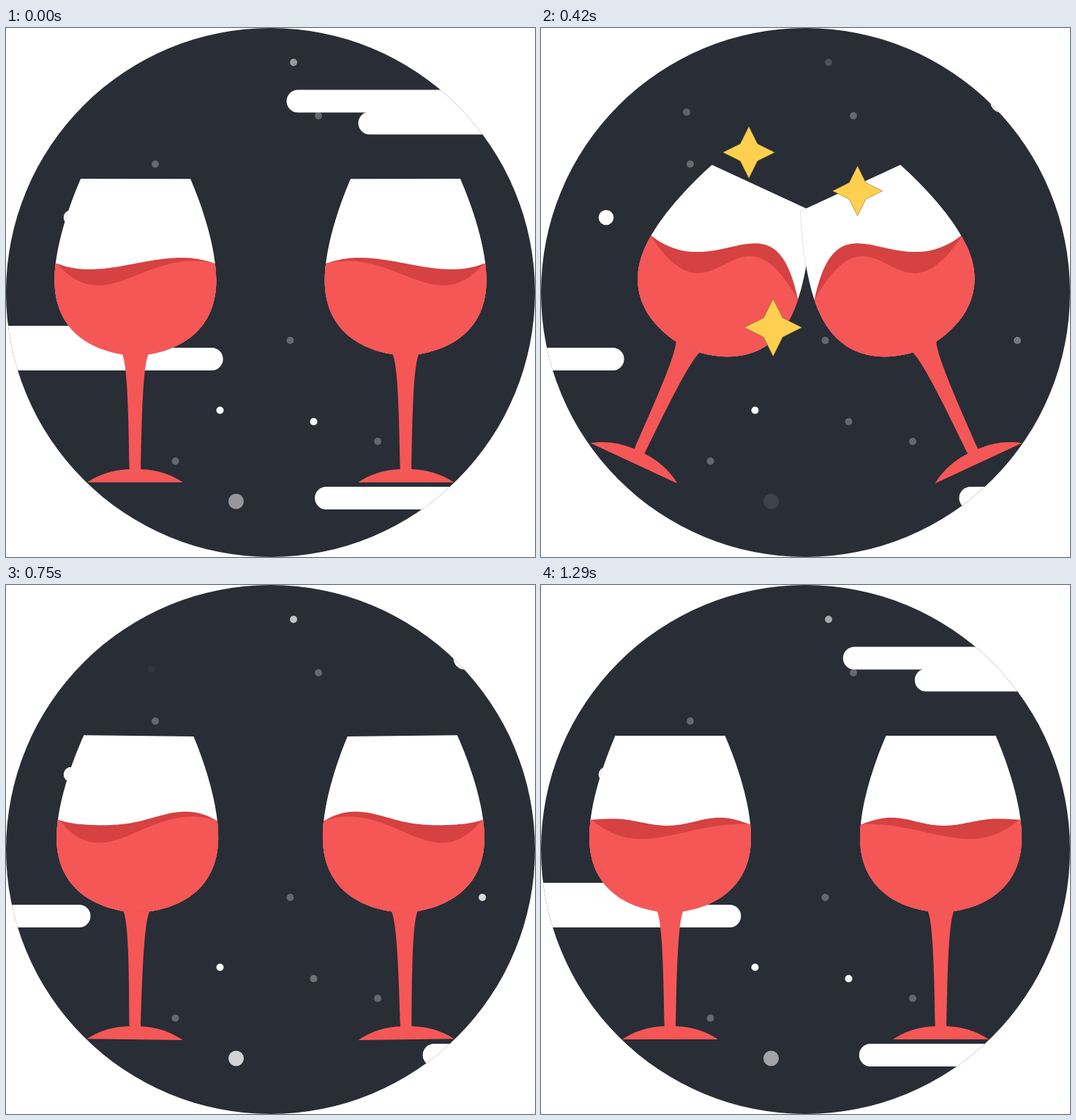
An HTML page with a canvas for the animation above (1350 ms loop, 723 px wide and 723 px high).

```html
<!DOCTYPE html>
<html lang="en">
<head>
<meta charset="utf-8">
<title>Cheers</title>
<style>
  html, body { margin: 0; width: 100%; height: 100%; overflow: hidden; background: #fff; }
  canvas { display: block; width: 723px; height: 723px; }
</style>
</head>
<body>
<canvas id="stage" width="723" height="723"></canvas>
<script>
const ctx = document.getElementById('stage').getContext('2d');
const SIZE = 723, LOOP = 1350, REST_X = 176.5, REST_Y = 330, MAX_TILT = 25.4;
const NIGHT = '#292d36', RED = '#f55757', DARK_RED = '#d64141', GOLD = '#ffd04f';
const lerp = (a, b, k) => a + (b - a) * k;

// Smooth curve through [time, value] keys, without overshoot.
function track(keys, t) {
  const last = keys.length - 1;
  let i = 0;
  while (i < last - 1 && t >= keys[i + 1][0]) i++;
  const slope = n => (keys[n + 1][1] - keys[n][1]) / (keys[n + 1][0] - keys[n][0]);
  const tangent = n => {
    if (n === 0) return slope(0);
    if (n === last) return slope(last - 1);
    const a = slope(n - 1), b = slope(n);
    return a * b <= 0 ? 0 : 2 * a * b / (a + b);
  };
  const [t0, v0] = keys[i], [t1, v1] = keys[i + 1];
  const span = t1 - t0, k = (t - t0) / span, j = 1 - k;
  return v0 * j * j * (1 + 2 * k) + v1 * k * k * (3 - 2 * k)
    + span * k * j * (tangent(i) * j - tangent(i + 1) * k);
}

// Rises from 0 at `from` to 1 at `peak`, back to 0 at `to`; may wrap around the loop.
function pulse(t, from, peak, to) {
  if (t < from) t += LOOP;
  if (t >= to) return 0;
  return t < peak ? (t - from) / (peak - from) : (to - t) / (to - peak);
}

const TILT = [[0, 0], [120, 10.56], [270, 23.6], [330, MAX_TILT], [510, 23.6],
  [630, 11.5], [780, 0], [LOOP, 0]];
const SLOSH = [[0, 28], [120, -75], [330, 0], [510, 133], [630, 76], [870, 10],
  [1290, 10], [LOOP, 28]];
const RIPPLE = [[0, 0], [630, 0], [870, 5], [1290, 5], [LOOP, 0]];
const DRIFT = [[0, 0], [120, .22], [330, .545], [510, 1], [630, 1], [870, .545],
  [1290, .107], [LOOP, 0]];

const STEADY_DOTS = [[427, 120], [204, 186], [388.5, 427], [508, 565], [231.5, 592]];
const TWINKLES = [
  { x: 393, y: 47, r: 5, max: 1, span: [345, 950, 345 + LOOP] },
  { x: 420.5, y: 538, r: 5, max: 1, span: [545, 1320, 545 + LOOP] },
  { x: 314.5, y: 647, r: 10.5, max: 1, span: [390, 870, 390 + LOOP] },
  { x: 199, y: 115, r: 5, max: .28, span: [80, 380, 800] },
  { x: 651, y: 427, r: 5, max: .85, span: [240, 740, 1280] }
];
const SPARKS = [
  { from: [321, 212], to: [248, 129], r: 42 },
  { from: [379, 250], to: [485, 196], r: 40 },
  { from: [339, 332], to: [296, 485], r: 48 }
];

const bowl = new Path2D('M-75 206C-91 243-110.5 300-110.5 345C-110.5 404-73 437-17.5 446' +
  'L17.5 446C73 437 110.5 404 110.5 345C110.5 300 91 243 75 206Z');
const foot = new Path2D('M-18 445.5C-10 463-9 540-7.7 603Q-40 604-65.5 621L65.5 621' +
  'Q40 604 7.7 603C9 540 10 463 18 445.5Z');

function disc(x, y, r, alpha = 1) {
  ctx.globalAlpha = alpha;
  ctx.beginPath();
  ctx.arc(x, y, r, 0, Math.PI * 2);
  ctx.fill();
  ctx.globalAlpha = 1;
}

function bar(left, right, top) {
  ctx.beginPath();
  ctx.roundRect(left, top, right - left, 31, 15.5);
  ctx.fill();
}

function drawSky(t) {
  ctx.fillStyle = '#fff';
  for (const [x, y] of STEADY_DOTS) disc(x, y, 5, .28);
  for (const { x, y, r, max, span } of TWINKLES) disc(x, y, r, max * pulse(t, ...span) ** .85);
  disc(89, 259, 10.3);
  disc(292.5, 522.5, 5);

  const drift = track(DRIFT, t);
  const left = 224 * drift, right = 282 * drift, low = 190 * drift ** 1.2;
  bar(-300, 162 - left, 407);
  bar(-300, 297 - left, 437);
  bar(383 + right, 1000, 84.5);
  bar(481 + right, 1100, 114.5);
  bar(422 + low, 1000, 627);
}

// Fills below a surface curve; push bends its two inner handles down (+) or up (-).
function fillWine(start, end, handlesX, push, ripple, color) {
  const [x0, y0] = start, [x3, y3] = end, steps = 48;
  const y1 = lerp(y0, y3, 1 / 3) + push[0], y2 = lerp(y0, y3, 2 / 3) + push[1];
  const cubic = (a, b, c, d, k) => {
    const j = 1 - k;
    return j * j * j * a + 3 * j * j * k * b + 3 * j * k * k * c + k * k * k * d;
  };
  ctx.beginPath();
  ctx.moveTo(-220, 540);
  ctx.lineTo(-220, y0);
  for (let i = 0; i <= steps; i++) {
    const k = i / steps;
    ctx.lineTo(cubic(x0, ...handlesX, x3, k),
      cubic(y0, y1, y2, y3, k) - ripple * Math.sin(3 * Math.PI * k));
  }
  ctx.lineTo(220, y3);
  ctx.lineTo(220, 540);
  ctx.fillStyle = color;
  ctx.fill();
}

function drawWine(t, lean) {
  const slosh = track(SLOSH, t), curl = pulse(t, 180, 330, 480);
  const start = [-107 + 15 * curl, 320 - 45 * lean + .08 * slosh];
  const end = [108 - 16 * curl, 330 + 67 * lean - .31 * slosh];
  const lift = -33 * lean, lag = 15 + .3 * slosh;
  fillWine(start, end, [-37 + 75 * curl, 37 + 80 * curl],
    [lift + slosh, lift - slosh - 40 * curl], track(RIPPLE, t), DARK_RED);
  fillWine(start, end, [-40 + 78 * curl, 15],
    [lift + 27 + slosh + lag, lift + 27 - slosh - lag], 0, RED);
}

function drawGlass(t, mirrored) {
  const tilt = track(TILT, t), angle = tilt * Math.PI / 180;
  const slide = tilt * (4.6 - .067 * tilt) * (mirrored ? .975 : 1);
  const y = REST_Y + .16 * tilt - 6 * pulse(t, 330, 510, 690);
  ctx.save();
  if (mirrored) {
    ctx.translate(SIZE, 0);
    ctx.scale(-1, 1);
  }
  ctx.translate(REST_X + slide, y);
  ctx.rotate(angle);
  ctx.translate(0, -REST_Y);
  ctx.strokeStyle = 'rgba(18, 20, 26, .15)';
  ctx.lineWidth = 1.6;
  ctx.stroke(bowl);
  ctx.fillStyle = '#fff';
  ctx.fill(bowl);
  ctx.fillStyle = RED;
  ctx.fill(foot);
  ctx.clip(bowl);
  // The wine surface stays level with the stage, not with the glass.
  ctx.translate(0, REST_Y);
  ctx.rotate(-angle);
  ctx.translate(0, -y);
  drawWine(t, tilt / MAX_TILT);
  ctx.restore();
}

function star(x, y, r) {
  ctx.beginPath();
  for (let i = 0; i < 8; i++) {
    const d = i % 2 ? r * .47 : r, a = i * Math.PI / 4;
    ctx.lineTo(x + d * Math.cos(a), y + d * Math.sin(a));
  }
  ctx.closePath();
  ctx.fillStyle = GOLD;
  ctx.fill();
  ctx.strokeStyle = 'rgba(110, 90, 45, .5)';
  ctx.lineWidth = 1;
  ctx.stroke();
}

function drawSparks(t) {
  if (t <= 285 || t >= 600) return;
  const burst = Math.min((t - 330) / 180, 1.2);
  for (const { from, to, r } of SPARKS) {
    const size = track([[285, 0], [330, 20], [510, r], [600, 0]], t);
    star(lerp(from[0], to[0], burst), lerp(from[1], to[1], burst), size);
  }
}

function draw(t) {
  ctx.fillStyle = '#fff';
  ctx.fillRect(0, 0, SIZE, SIZE);
  ctx.save();
  ctx.fillStyle = NIGHT;
  disc(SIZE / 2, SIZE / 2, SIZE / 2);
  ctx.clip();
  drawSky(t);
  drawGlass(t, false);
  drawGlass(t, true);
  drawSparks(t);
  ctx.restore();
}

const start = performance.now();
function tick() {
  draw((performance.now() - start) % LOOP);
  requestAnimationFrame(tick);
}
tick();
</script>
</body>
</html>
```
